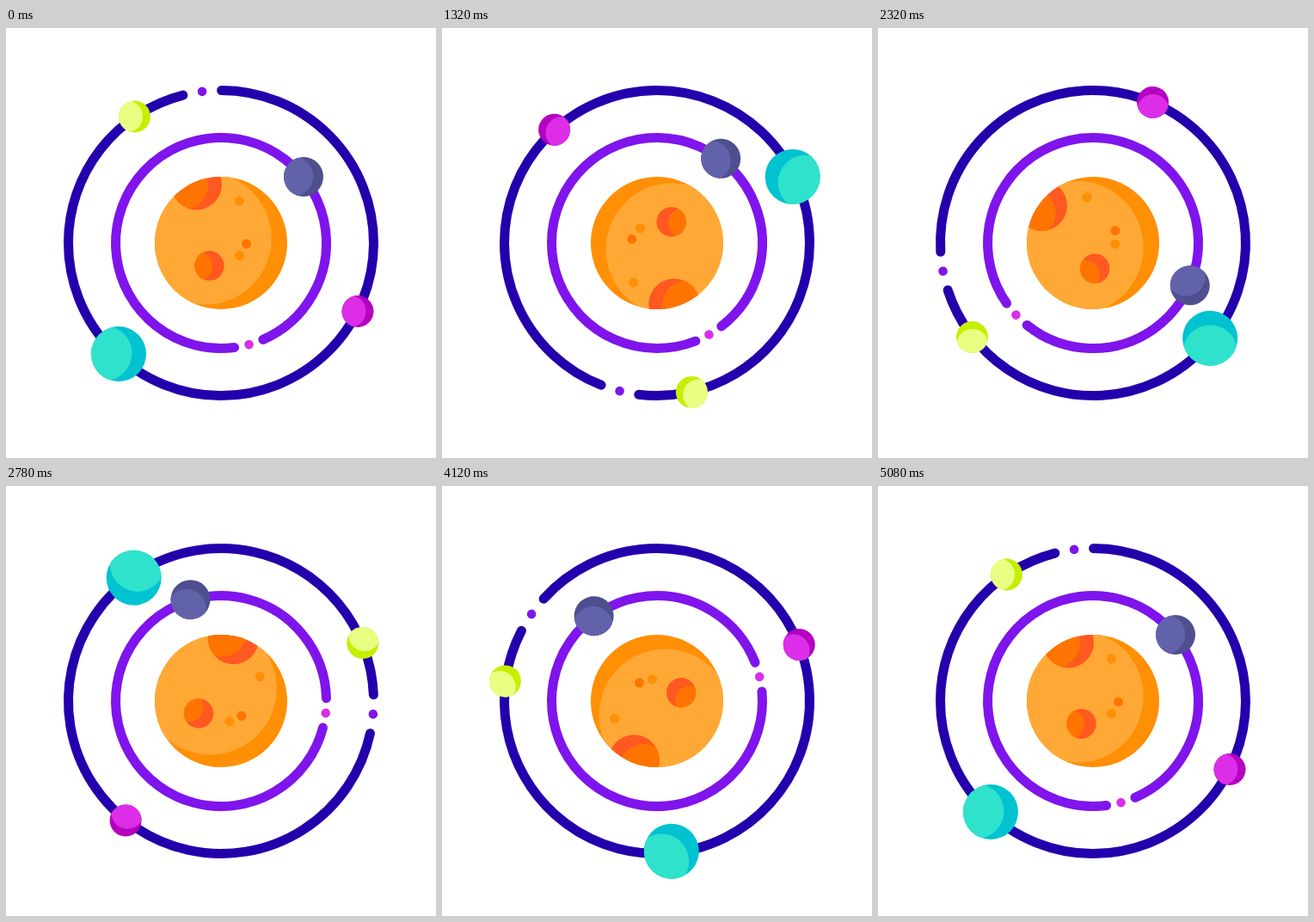
Animation, 500 px wide and 500 px high, one loop 5100 ms. Source, as an HTML page with a canvas:

```html
<!DOCTYPE html>
<html lang="en">
<head>
<meta charset="utf-8">
<title>Orbits</title>
<style>
html, body { margin: 0; width: 100%; height: 100%; overflow: hidden; background: #fff; }
canvas { display: block; width: 100vmin; height: 100vmin; }
</style>
</head>
<body>
<canvas id="stage" width="500" height="500"></canvas>
<script>
const ctx = document.getElementById('stage').getContext('2d');
const LOOP = 5100, STEP = 20, STEPS_PER_CYCLE = 127;
const rad = deg => deg * Math.PI / 180;

function disc(x, y, r, color) {
  ctx.beginPath();
  ctx.arc(x, y, r, 0, 2 * Math.PI);
  ctx.fillStyle = color;
  ctx.fill();
}

// Disc in shade, with a lit disc of the same size shifted by (dx, dy) inside it
function ball(x, y, r, lit, shade, dx, dy) {
  ctx.save();
  disc(x, y, r, shade);
  ctx.clip();
  disc(x + dx, y + dy, r, lit);
  ctx.restore();
}

// Open ring with a dot in the middle of its gap
function ring(r, gapAt, halfGap, color, dotColor) {
  ctx.beginPath();
  ctx.arc(0, 0, r, rad(gapAt + halfGap), rad(gapAt - halfGap + 360));
  ctx.lineWidth = 11;
  ctx.lineCap = 'round';
  ctx.strokeStyle = color;
  ctx.stroke();
  disc(r * Math.cos(rad(gapAt)), r * Math.sin(rad(gapAt)), 5.3, dotColor);
}

function sun() {
  ball(0, 0, 77, '#ffa836', '#ff8f05', -18.3, -5.2);
  disc(0, 0, 0, '#fff');
  ctx.save();
  ctx.beginPath();
  ctx.arc(0, 0, 77, 0, 2 * Math.PI);
  ctx.clip();
  ball(-28.5, -68, 29.5, '#ff7400', '#ff5821', -16, 0.5);
  ctx.restore();
  ball(-13.5, 26.5, 17.2, '#ff7400', '#ff5821', -13.7, 0.4);
  disc(21.5, -49, 5.5, '#ff8f05');
  disc(29.5, 1, 5.5, '#ff7400');
  disc(21.5, 14.5, 5.5, '#ff8f05');
}

function innerOrbit() {
  ring(122.5, 74.6, 8.1, '#7f14ec', '#d92fe8');
  ball(96, -77, 23, '#6262ab', '#4f4f8f', -11.8, -0.4);
}

function outerOrbit() {
  ring(177.5, -97.1, 7.3, '#2400ad', '#7f14ec');
  ball(-100.5, -147, 18.5, '#e8ff82', '#c4ef00', -9, -0.2);
  ball(159, 79.5, 18.5, '#dc2ee8', '#b400c0', -9, -0.2);
  ball(-119, 129, 32, '#2fe2cc', '#00c2d1', -16.5, -0.8);
}

function spin(turns, draw) {
  ctx.save();
  ctx.translate(250, 250);
  ctx.rotate(turns * 2 * Math.PI);
  draw();
  ctx.restore();
}

const start = performance.now();
function frame() {
  const t = (performance.now() - start) % LOOP;
  const cycle = Math.floor(t / STEP) / STEPS_PER_CYCLE;
  ctx.fillStyle = '#fff';
  ctx.fillRect(0, 0, 500, 500);
  spin(cycle, sun);
  spin(-2 * cycle, innerOrbit);
  spin(3 * cycle, outerOrbit);
  requestAnimationFrame(frame);
}
frame();
</script>
</body>
</html>
```
